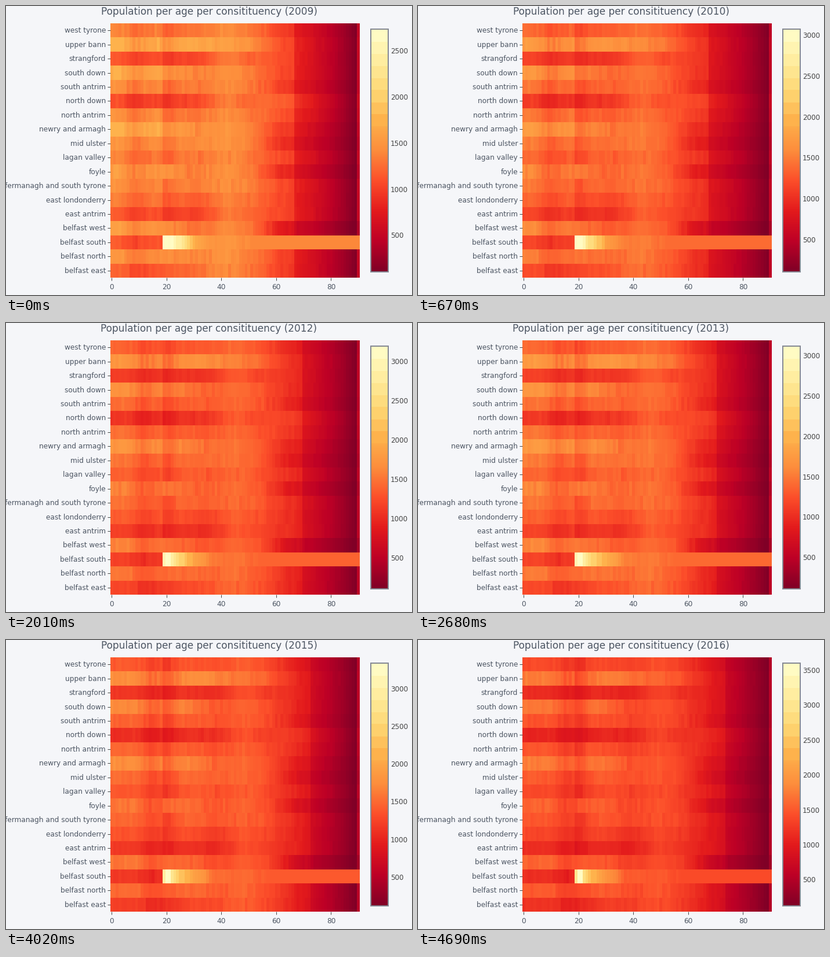
These frames come from a looping animation (700x500 px, 7370 ms). A matplotlib script:

```python
import numpy as np
import matplotlib.pyplot as plt
from matplotlib.animation import FuncAnimation
from matplotlib.colors import LinearSegmentedColormap, ListedColormap
from matplotlib.patches import Rectangle

WIDTH, HEIGHT, DPI = 700, 500, 100
LEFT, RIGHT, TOP, BOTTOM = 180, 610, 30, 470
BAR_LEFT, BAR_RIGHT, BAR_TOP, BAR_BOTTOM = 629, 659, 40, 460
INK, DARK = "#4D5663", "#444444"
FIRST_YEAR, LAST_STEP = 2009, 7
STEP_MS, STEPS = 670, 11
AGES = np.arange(91)

# Typical people per year of age: children, adults near 30, people near 60.
AREAS = {
    "west tyrone": (1300, 1290, 1030),
    "upper bann": (1600, 1640, 1130),
    "strangford": (1060, 1030, 1100),
    "south down": (1580, 1350, 1100),
    "south antrim": (1360, 1310, 1020),
    "north down": (1000, 1040, 1230),
    "north antrim": (1380, 1290, 1150),
    "newry and armagh": (1620, 1440, 1020),
    "mid ulster": (1410, 1410, 920),
    "lagan valley": (1280, 1290, 1080),
    "foyle": (1450, 1350, 900),
    "fermanagh and south tyrone": (1380, 1330, 1110),
    "east londonderry": (1270, 1150, 1080),
    "east antrim": (1070, 980, 1080),
    "belfast west": (1460, 1250, 780),
    "belfast south": (1080, 1500, 1040),
    "belfast north": (1400, 1380, 1060),
    "belfast east": (1110, 1260, 1040),
}
STUDENT_AREA = "belfast south"
PEAKS = [2738, 3078, 3504, 3198, 3120, 3092, 3340, 3603]

rng = np.random.default_rng(9)
COHORT_NOISE = rng.normal(1, 0.02, (len(AREAS), AGES.size + LAST_STEP))


def students(step):
    peak = PEAKS[step]
    settled = min(1700 + 60 * step, 1950)
    return np.interp(AGES, [19, 20, 21, 22, 24, 27, 30, 34, 38],
                     [min(peak, 2950), peak, 0.98 * peak, min(peak, 2800),
                      2450, 2180, settled, 0.92 * settled, 1400], left=0)


def area_row(name, noise, step):
    """Cohorts grow one year older per step; age effects stay in place."""
    children, adults, elders = AREAS[name]
    born = AGES - step
    forties = 930 + 0.4 * adults
    row = np.interp(born, [3, 8, 16, 31, 42, 50, 62],
                    [1.08 * children, 0.94 * children, 1.03 * children,
                     adults, forties, 0.92 * forties, elders])
    row *= noise[born + LAST_STEP]
    row *= np.interp(born, [66, 67, 75, 89], [1, 0.82, 0.75, 0.65])
    row *= np.interp(AGES, [55, 66, 73, 80, 85, 89], [1, 0.93, 0.8, 0.58, 0.38, 0.18])
    row *= 1 + 0.01 * step * np.exp(-((AGES - 31) / 7) ** 2)
    if name.startswith(("belfast", "foyle")):
        leaving = 0
    else:
        leaving = 0.11
    row *= 1 - leaving * np.interp(AGES, [18, 19, 21, 25], [0, 1, 1, 0])
    row[-1] = 0.48 * elders
    return np.maximum(row, students(step)) if name == STUDENT_AREA else row


def population(step):
    return np.array([area_row(name, noise, step)
                     for name, noise in zip(AREAS, COHORT_NOISE)])


def make_colormap():
    stops = ["#800026", "#bd0026", "#e31a1c", "#fc4e2a", "#fd8d3c",
             "#feb24c", "#fed976", "#ffeda0", "#ffffcc"]
    smooth = LinearSegmentedColormap.from_list("heat", stops, 512)
    t = np.linspace(0, 1, 512)
    banded = 0.6 + (np.floor((t - 0.6) / 0.05) + 0.5) * 0.05
    return ListedColormap(smooth(np.where(t > 0.6, np.minimum(banded, 0.98), t)))


fig = plt.figure(figsize=(WIDTH / DPI, HEIGHT / DPI), dpi=DPI, facecolor="#F5F6F9")
ax = fig.add_axes([0, 0, 1, 1])
plt.rcParams["font.family"] = "DejaVu Sans"
cmap = make_colormap()


def px(size):
    return size * 72 / DPI


def label(x, y, text, align, size=12.1, color=INK):
    return ax.text(x, y, text, ha=align, va="baseline", fontsize=px(size), color=color)


def tick(xs, ys):
    ax.plot(xs, ys, color=DARK, lw=px(1), solid_capstyle="butt")


def image(data, extent):
    return ax.imshow(data, cmap=cmap, aspect="auto", interpolation="nearest", extent=extent)


heat = image(population(0), (LEFT, RIGHT, BOTTOM, TOP))
image(np.linspace(1, 0, BAR_BOTTOM - BAR_TOP)[:, None],
      (BAR_LEFT, BAR_RIGHT, BAR_BOTTOM, BAR_TOP))
ax.add_patch(Rectangle((BAR_LEFT, BAR_TOP), BAR_RIGHT - BAR_LEFT, BAR_BOTTOM - BAR_TOP,
                       fill=False, ec="#858994", lw=px(2)))

row_height = (BOTTOM - TOP) / len(AREAS)
for i, name in enumerate(AREAS):
    y = TOP + (i + 0.5) * row_height
    label(172, y + 4, name, "right")
    tick([LEFT - 5, LEFT], [y, y])
for age in range(0, 81, 20):
    x = LEFT + (age + 0.5) * (RIGHT - LEFT) / AGES.size
    label(x, 490, str(age), "center")
    tick([x, x], [BOTTOM, BOTTOM + 5])

title = label(350, 15, "", "center", 17)
scale_labels = {v: label(663, 0, str(v), "left", 12, DARK) for v in range(500, 3501, 500)}
ax.set(xlim=(0, WIDTH), ylim=(HEIGHT, 0))
ax.axis("off")


def update(frame):
    step = min(frame, LAST_STEP)
    low, high = 105 + 0.45 * step ** 2, PEAKS[step]
    heat.set_data(population(step))
    heat.set_clim(low, high)
    title.set_text(f"Population per age per consitituency ({FIRST_YEAR + step})")
    for value, text in scale_labels.items():
        share = (value - low) / (high - low)
        text.set_y(BAR_BOTTOM - share * (BAR_BOTTOM - BAR_TOP) + 4.4)
        text.set_visible(share <= 1)
    return [heat, title, *scale_labels.values()]


anim = FuncAnimation(fig, update, frames=STEPS, interval=STEP_MS,
                     repeat=True, repeat_delay=0, blit=False)
plt.show()
```
